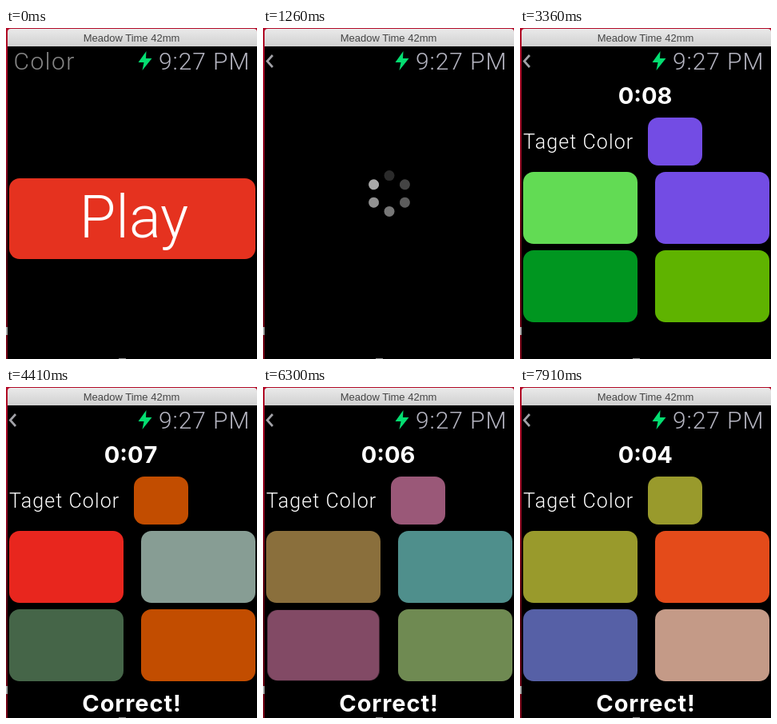
An HTML page that plays this animation: 314 px wide and 414 px high, repeating every 8 s.

```html
<!DOCTYPE html>
<html lang="en">
<head>
<meta charset="utf-8">
<title>Color game</title>
<style>
html, body { margin: 0; width: 100%; height: 100%; overflow: hidden; background: #000; }
svg { display: block; width: 314px; height: 414px; }
text { font-family: Roboto, sans-serif; font-weight: 300; fill: #fff; }
.bold { font: 700 29px Inter, sans-serif; }
.header { font-size: 30px; }

/* Every animation shares one 8 s loop and changes in hard steps. */
.home, .title, .back, .spinner, .dots, .game, .correct, .digits, .press, .cell {
  animation: 8s step-end infinite;
}
.home { animation-name: push; }
.title { animation-name: title-out; }
.back { animation-name: back-in; }
.spinner { animation-name: loading; }
.dots { animation-name: spin; }
.game { animation-name: appear; }
.correct { animation-name: correct; }
.digits { animation-name: countdown; }
.press {
  animation-name: press;
  animation-delay: calc(var(--at) - 8s);
  transform-box: fill-box;
  transform-origin: center;
}
.cell { animation-name: recolor; }

@keyframes push {
  0% { transform: none; opacity: 1; }
  12.25% { transform: translateX(-40px); opacity: .85; }
  13.125% { transform: translateX(-130px); opacity: .6; }
  14% { transform: translateX(-220px); opacity: .35; }
  14.875% { transform: translateX(-285px); opacity: .15; }
  15.75%, 100% { transform: translateX(-314px); opacity: 0; }
}
@keyframes title-out {
  0% { opacity: 1; } 12.25% { opacity: .85; } 13.125% { opacity: .6; }
  14% { opacity: .35; } 14.875% { opacity: .15; } 15.75%, 100% { opacity: 0; }
}
@keyframes back-in {
  0% { opacity: 0; } 12.25% { opacity: .15; } 13.125% { opacity: .4; }
  14% { opacity: .65; } 14.875% { opacity: .85; } 15.75%, 100% { opacity: 1; }
}
@keyframes loading {
  0% { opacity: 0; } 15.75% { opacity: 1; } 21%, 100% { opacity: 0; }
}
@keyframes spin {
  0% { transform: rotate(0); } 17.5% { transform: rotate(60deg); } 19.25%, 100% { transform: rotate(120deg); }
}
@keyframes appear {
  0% { opacity: 0; } 21% { opacity: .4; } 21.875% { opacity: .8; } 22.75%, 100% { opacity: 1; }
}
@keyframes correct {
  0% { opacity: 0; } 43.75%, 100% { opacity: 1; }
}
@keyframes countdown {
  0% { transform: none; }
  42% { transform: translateY(-40px); }
  55.125% { transform: translateY(-80px); }
  68.25% { transform: translateY(-120px); }
  81.375% { transform: translateY(-160px); }
  94.5%, 100% { transform: translateY(-200px); }
}
@keyframes press {
  0% { transform: scale(.98); opacity: .85; }
  .875% { transform: scale(.96); opacity: .7; }
  1.75% { transform: scale(.976); opacity: .82; }
  2.625% { transform: scale(.995); opacity: .945; }
  3.5%, 100% { transform: none; opacity: 1; }
}
@keyframes recolor {
  0% { fill: var(--a); } 43.75% { fill: var(--b); } 65.625% { fill: var(--c); } 84%, 100% { fill: var(--d); }
}
</style>
</head>
<body>
<svg viewBox="0 0 314 414">
  <defs>
    <linearGradient id="bar" x2="0" y2="1">
      <stop stop-color="#eaeaea"/><stop offset="1" stop-color="#d0d0d0"/>
    </linearGradient>
    <linearGradient id="edge" x2="0" y2="1">
      <stop stop-color="#b40a28"/><stop offset=".4" stop-color="#8c0820"/>
      <stop offset=".7" stop-color="#50040f"/><stop offset="1" stop-color="#7a0618"/>
    </linearGradient>
    <clipPath id="screen"><path d="M2 23H314V414H2z"/></clipPath>
    <clipPath id="digit"><path d="M171 68H193V100H171z"/></clipPath>
  </defs>

  <path fill="url(#edge)" d="M0 0H314V414H0z"/>
  <path fill="#aaa" d="M0 374H2V384H0z"/>
  <path d="M2 20H314V414H2z"/>
  <path fill="#888" d="M141 413H150V414H141z"/>
  <path fill="url(#bar)" d="M2 23V5Q2 1 6 1H310Q314 1 314 5V23z"/>
  <text x="157" y="17" text-anchor="middle" style="font: 13px 'Liberation Sans', sans-serif; fill: #454545">Meadow Time 42mm</text>

  <g clip-path="url(#screen)">
    <text class="header title" x="9.5" y="52" letter-spacing="1.5" style="fill: #868686">Color</text>
    <path class="back" d="M12 34L5.3 41.5L12 49" fill="none" stroke="#a2a2a8" stroke-width="2.7"/>
    <path d="M175.5 29L165.5 43H172.5L170.5 53L182.5 38H175z" fill="#04de71"/>
    <text class="header" x="191" y="52" letter-spacing=".9" style="fill: #b4b4c0">9:27 PM</text>

    <g class="home">
      <g class="press" style="--at: .56s">
        <rect x="4" y="188" width="308" height="101" rx="13" fill="#e5321f"/>
        <text x="160" y="262" font-size="74" text-anchor="middle">Play</text>
      </g>
    </g>

    <g class="spinner" transform="translate(158 207)">
      <g class="dots" id="dots" fill="#aaa"></g>
    </g>

    <g class="game">
      <text class="bold" x="171.5" y="95" text-anchor="end">0:0</text>
      <g clip-path="url(#digit)">
        <g class="digits bold" id="digits" text-anchor="middle"></g>
      </g>
      <text x="4" y="151" font-size="25" letter-spacing="1.1">Taget Color</text>
      <rect class="cell" x="160" y="112" width="68" height="60" rx="13"
        style="--a: #734ce4; --b: #c24d00; --c: #9a5878; --d: #999a2c"/>
      <g class="press" style="--at: 7.63s">
        <rect class="cell" x="4" y="180" width="143" height="90" rx="13"
          style="--a: #62db54; --b: #e8261e; --c: #8a6f3c; --d: #999a2c"/>
      </g>
      <g class="press" style="--at: 3.08s">
        <rect class="cell" x="169" y="180" width="143" height="90" rx="13"
          style="--a: #734ce4; --b: #879d94; --c: #4f8f8c; --d: #e44b1a"/>
      </g>
      <g class="press" style="--at: 6.3s">
        <rect class="cell" x="4" y="278" width="143" height="90" rx="13"
          style="--a: #009620; --b: #456548; --c: #9a5878; --d: #5660a6"/>
      </g>
      <g class="press" style="--at: 4.83s">
        <rect class="cell" x="169" y="278" width="143" height="90" rx="13"
          style="--a: #5fb300; --b: #c24d00; --c: #6f8a52; --d: #c49a87"/>
      </g>
      <text class="bold correct" x="157.5" y="406" text-anchor="middle" letter-spacing=".9">Correct!</text>
    </g>
  </g>
</svg>
<script>
const add = (parentId, tag, attributes, content = '') => {
  const node = document.createElementNS('http://www.w3.org/2000/svg', tag);
  for (const [name, value] of Object.entries(attributes)) node.setAttribute(name, value);
  node.textContent = content;
  document.getElementById(parentId).append(node);
};

for (let i = 0; i < 6; i++) {
  add('dots', 'circle', { cy: -22.4, r: 6.5, opacity: 0.25 + i * 0.15, transform: `rotate(${i * 60})` });
  add('digits', 'text', { x: 181, y: 95 + i * 40, class: 'bold' }, 9 - i);
}
</script>
</body>
</html>
```
